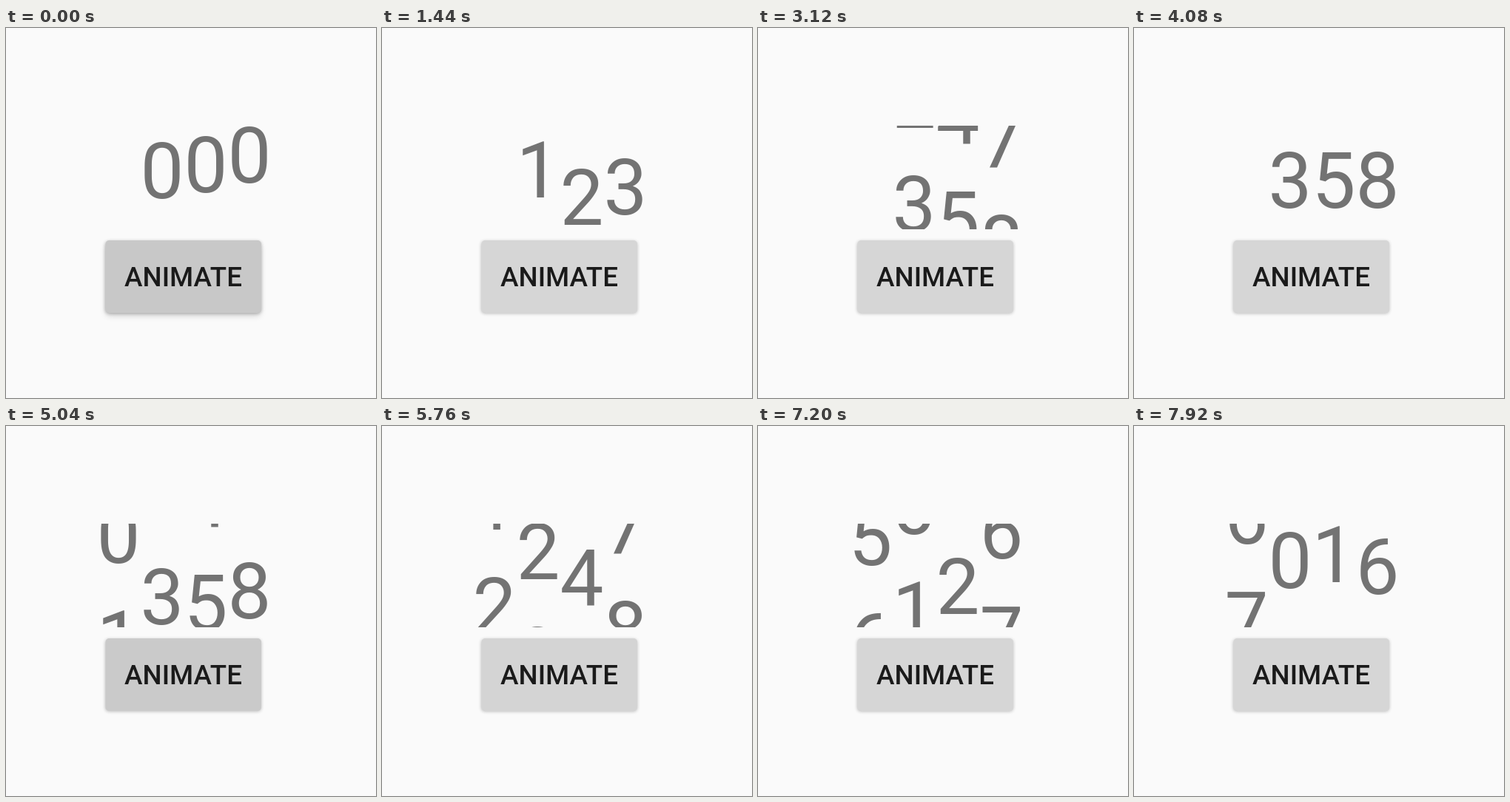
An HTML page for the animation above (8 s loop, 500 by 500 pixels).

```html
<!DOCTYPE html>
<html lang="en">
<head>
<meta charset="utf-8">
<title>Rolling number</title>
<style>
  html, body { margin: 0; width: 100%; height: 100%; overflow: hidden; background: #fafafa; }
  svg { display: block; width: 100%; height: 100%; }
  text { font-family: Roboto, sans-serif; text-anchor: middle; }
  #digits { font-size: 105px; fill: #737373; }
  #label { font-size: 36.75px; font-weight: 500; fill: #1a1a1a; }
</style>
</head>
<body>
<svg viewBox="0 0 500 500">
  <defs>
    <clipPath id="window"><rect x="110" y="132" width="270" height="140"/></clipPath>
    <filter id="soft" x="-20%" y="-30%" width="140%" height="160%"><feGaussianBlur stdDeviation="2.2"/></filter>
    <filter id="wide" x="-20%" y="-30%" width="140%" height="160%"><feGaussianBlur stdDeviation="4.5"/></filter>
  </defs>
  <g clip-path="url(#window)"><g id="digits"></g></g>
  <rect id="lift" x="135" y="292" width="209" height="97" rx="5" filter="url(#wide)"/>
  <rect x="134" y="288" width="211" height="98" rx="5" opacity=".24" filter="url(#soft)"/>
  <rect id="face" x="134.5" y="287" width="210.5" height="98" rx="5"/>
  <text id="label" x="239.5" y="349">ANIMATE</text>
</svg>
<script>
const LOOP = 8000, STEP = 240, PITCH = 140, BASE = 243, ADVANCE = 58.96;
const FIRST = -265, SECOND = 4393;
const $ = id => document.getElementById(id);

// Start and end digits of each roll, with [time, phase] points.
const rolls = [
  { from: [0, 0, 0, 0], to: [0, 3, 5, 8],
    keys: [[0, .112], [240, .1227], [3850, 1]] },
  { from: [0, 3, 5, 8], to: [7, 0, 1, 6],
    keys: [[SECOND, 0], [7200, .6816], [8000, .865]] }
];

const clamp = v => Math.min(1, Math.max(0, v));
const ease = u => .5 - .5 * Math.cos(Math.PI * u);

function phase(keys, t) {
  for (let i = 1; i < keys.length; i++) {
    const [t0, u0] = keys[i - 1], [t1, u1] = keys[i];
    if (t <= t1) return u0 + (u1 - u0) * clamp((t - t0) / (t1 - t0));
  }
  return keys[keys.length - 1][1];
}

function addGlyph(x) {
  const el = document.createElementNS("http://www.w3.org/2000/svg", "text");
  el.setAttribute("x", x);
  return $("digits").appendChild(el);
}

const columns = [0, 1, 2, 3].map(i => {
  const x = 152.1 + i * ADVANCE;
  return [addGlyph(x), addGlyph(x)];
});

function drawButton(t) {
  const age = t - (t < SECOND - 300 ? FIRST : SECOND);
  const down = clamp((age + 250) / 200);
  const press = down * clamp((1500 - age) / 1000);
  const lift = down * clamp((450 - age) / 300);
  const grey = Math.round(214 - 14 * press);
  $("face").setAttribute("fill", `rgb(${grey},${grey},${grey})`);
  $("lift").setAttribute("opacity", lift * .25);
}

function draw(t) {
  const roll = rolls[t < SECOND ? 0 : 1];
  const f = ease(phase(roll.keys, t));
  columns.forEach((pair, i) => {
    const p = roll.from[i] + (roll.to[i] - roll.from[i]) * f;
    const shown = i > 0 || t >= SECOND;
    pair.forEach((el, k) => {
      const d = Math.floor(p) + k;
      el.textContent = shown ? d % 10 : "";
      el.setAttribute("y", BASE + PITCH * (d - p));
    });
  });
  drawButton(t);
}

const start = performance.now();
function tick() {
  const t = (performance.now() - start) % LOOP;
  draw(Math.floor(t / STEP) * STEP);
  requestAnimationFrame(tick);
}
tick();
</script>
</body>
</html>
```
